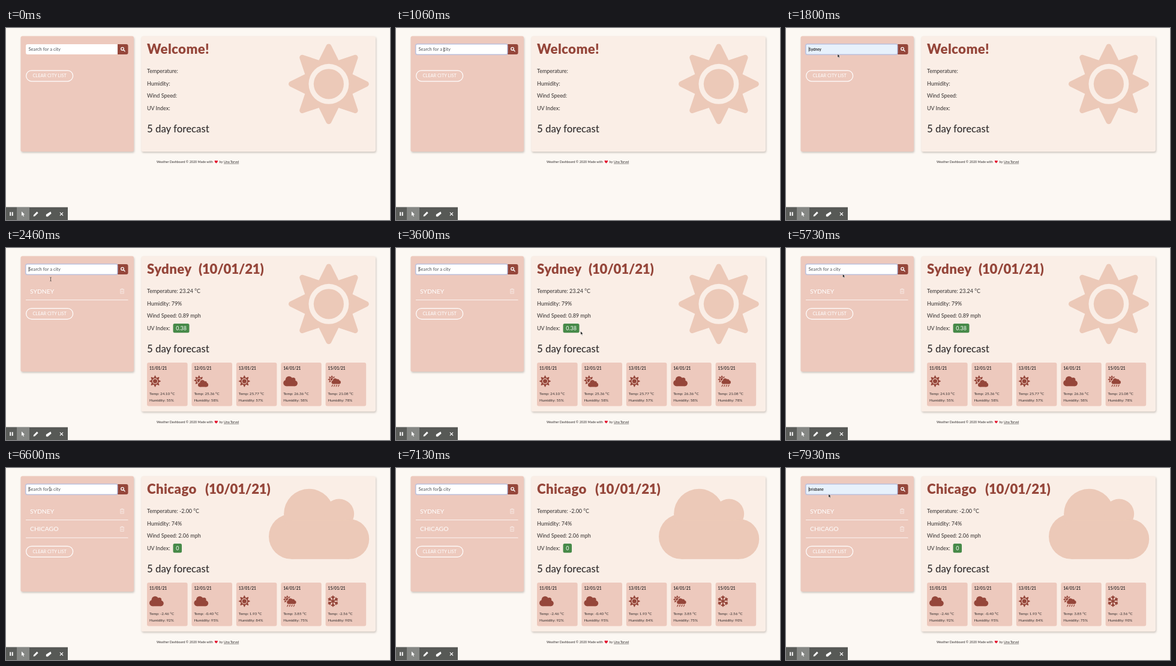
An HTML page for the animation above (8000 ms loop, 640 px wide and 320 px high).

```html
<!DOCTYPE html>
<html lang="en">
<head>
<meta charset="utf-8">
<title>Weather Dashboard</title>
<style>
  html, body { margin: 0; width: 100%; height: 100%; overflow: hidden; background: #fcf8f3; }
  svg { display: block; width: 640px; height: 320px; }
  text { font-family: Lato, "Open Sans", sans-serif; fill: #332f2f; white-space: pre; }
  .panel { filter: drop-shadow(1.5px 2px 1.5px rgba(70, 50, 40, .25)); }
  .title { font-size: 22.2px; font-weight: 900; fill: #95463a; letter-spacing: .4px; }
  .today { letter-spacing: -.25px; }
  .sub { font-size: 16.8px; font-weight: 500; }
  .info { font-size: 8.95px; }
  .date { font-size: 6.6px; font-weight: 700; }
  .small { font-size: 6.25px; }
  .foot { font-size: 5.4px; }
  .city { font-size: 10.4px; fill: #fff; }
  .clear { font-size: 7.4px; fill: #fff; }
  .hint { font-size: 7.6px; fill: #50555a; }
  .fill { font: 500 5.9px Inter, "Liberation Sans", sans-serif; fill: #111; }
</style>
</head>
<body>
<svg id="stage" viewBox="0 0 640 320"></svg>
<script>
const LOOP = 8000;
const PINK = '#edc9bd', PALE = '#faeee6', PEACH = '#ecc9b8', BROWN = '#95463a';

const text = (x, y, cls, s, extra = '') => `<text x="${x}" y="${y}" class="${cls}" ${extra}>${s}</text>`;
const rect = (x, y, w, h, r, fill, extra = '') =>
  `<rect x="${x}" y="${y}" width="${w}" height="${h}" rx="${r}" fill="${fill}" ${extra}/>`;
const circle = (x, y, r, fill) => `<circle cx="${x}" cy="${y}" r="${r}" fill="${fill}"/>`;
const group = (id, body, extra = '') => `<g id="${id}" ${extra}>${body}</g>`;

// Icons live in a box 512 units high.
function sun(cx, cy, size, color, back) {
  const at = (r, a) => `${(r * Math.cos(a)).toFixed(1)} ${(r * Math.sin(a)).toFixed(1)}`;
  const half = Math.PI / 8, bevel = 0.063, tip = 0.035;
  let d = '';
  for (let i = 0; i < 8; i++) {
    const a = i * Math.PI / 4;
    d += `${i ? 'L' : 'M'}${at(164, a - half)}L${at(247, a - bevel)}` +
      `C${at(259.4, a - tip)} ${at(259.4, a + tip)} ${at(247, a + bevel)}`;
  }
  return `<g transform="translate(${cx} ${cy}) scale(${size / 256})"><path d="${d}Z" fill="${color}"/>` +
    circle(0, 0, 128, back) + circle(0, 0, 96, color) + '</g>';
}

function puffs(list, color, gap) {
  const first = list[0], last = list[3];
  const bottom = first[1] + first[2], top = bottom - first[2] * 1.7;
  const body = list.map(c => circle(...c, color)).join('') +
    rect(first[0], top, last[0] - first[0], bottom - top, 0, color);
  const edge = gap ? `<g stroke="${gap}" stroke-width="64">${body}</g>` : '';
  return edge + body;
}

const icons = {
  sun: (c, b) => sun(256, 256, 256, c, b),
  cloud: c => puffs([[144, 336, 144], [256, 192, 160], [448, 192, 96], [512, 352, 128]], c),
  cloudSun: (c, b) => sun(224, 224, 224, c, b) +
    puffs([[272, 416, 96], [376, 312, 112], [512, 320, 64], [544, 416, 96]], c, b),
  rain: (c, b) => sun(176, 176, 176, c, b) +
    puffs([[240, 304, 80], [320, 224, 96], [432, 240, 80], [496, 304, 80]], c, b) +
    rect(120, 386, 456, 126, 0, b) +
    [210, 306, 402, 498].map(x => `<path d="M${x} 424l-36 66" stroke="${c}" stroke-width="34" stroke-linecap="round"/>`).join(''),
  snow: c => [0, 60, 120, 180, 240, 300].map(a =>
    `<path d="M224 256V30M166 66l58 56 58-56" transform="rotate(${a} 224 256)" fill="none" stroke="${c}" stroke-width="54" stroke-linecap="round"/>`).join('')
};
const icon = (name, x, y, h, color, back) =>
  `<g transform="translate(${x} ${y}) scale(${h / 512})">${icons[name](color, back)}</g>`;

function card(i, [name, temp, hum]) {
  const x = 235 + i * 74.4;
  return rect(x, 191, 67.6, 72.5, 3, PINK) +
    text(x + 4, 202.8, 'date', `${11 + i}/01/21`) +
    icon(name, x + 4, 212.5, 19, BROWN, PINK) +
    text(x + 4, 244.6, 'small', `Temp: ${temp} °C`) +
    text(x + 4, 256.3, 'small', `Humidity: ${hum}%`);
}

function view(id, v) {
  const rows = ['Temperature:', 'Humidity:', 'Wind Speed:', 'UV Index:'];
  let s = rect(225.5, 13.5, 390.5, v.days ? 259 : 192.5, 3, PALE, 'class="panel"');
  s += icon(v.icon, v.icon === 'sun' ? 471 : 438, 26.4, 133.8, PEACH, PALE);
  s += text(235, 43, 'title', v.name);
  if (v.days) s += text(v.dateX, 43, 'title today', '(10/01/21)');
  rows.forEach((r, i) => {
    s += text(235, 75.4 + i * 20.5, 'info', v.info && i < 3 ? `${r} ${v.info[i]}` : r);
  });
  if (v.days) {
    s += rect(278.5, 126, v.uvW, 15.3, 2.5, '#478a49');
    s += text(278.5 + v.uvW / 2, 137, 'info', v.uv, 'text-anchor="middle" style="fill:#fff"');
    s += v.days.map((d, i) => card(i, d)).join('');
  }
  return group(id, s + text(235, 173.6, 'sub', '5 day forecast'));
}

function cityRow(id, name, y) {
  const bin = `<path d="M190 ${y - 3}h7M192.3 ${y - 3}v-1h2.4v1M190.8 ${y - 3}v6.8h5.4v-6.8M192.4 ${y - 1}v3M194.6 ${y - 1}v3" fill="none" stroke="#fff" stroke-width=".7" opacity=".75"/>`;
  return group(id, text(40, y + 3.7, 'city', name) + bin +
    `<path d="M33 ${y + 14.6}h170.5" stroke="#fff" stroke-width=".8"/>`);
}

const sidebar =
  rect(24.5, 13.5, 188.5, 192.5, 3, PINK, 'class="panel"') +
  rect(33, 27, 156, 17, 3, '#fff') +
  '<path d="M186 26.9h14.5q3 0 3 3v11.2q0 3-3 3h-14.5z" fill="#95463a"/>' +
  '<g fill="none" stroke="#fff" stroke-width="1.3"><circle cx="194" cy="34.7" r="2.3"/><path d="M195.8 36.5l2.3 2.3" stroke-linecap="round"/></g>' +
  group('focus',
    rect(32.6, 26.6, 153.4, 17.8, 3, 'none', 'stroke="#a9bdf0" stroke-opacity=".4" stroke-width="1.8"') +
    rect(33, 27, 152.8, 17, 2.6, '#fff', 'id="field" stroke="#a7b3da" stroke-width=".8"')) +
  text(37.5, 38, 'hint', 'Search for a city', 'id="hint"') +
  text(38, 37.8, 'fill', '', 'id="typed"') +
  '<path id="caret" d="M38.2 31.5v8" stroke="#222" stroke-width=".7"/>' +
  cityRow('row1', 'SYDNEY', 72) + cityRow('row2', 'CHICAGO', 101.7) +
  group('clear', rect(33.6, 70.8, 78, 18, 9, 'none', 'stroke="#fff" stroke-width="1.2"') +
    text(72.6, 82.4, 'clear', 'CLEAR CITY LIST', 'text-anchor="middle"'));

const footer = group('footer',
  text(251, 224.8, 'foot', 'Weather Dashboard © 2020 Made with') +
  '<path id="heart" d="M0 2.4C-4-.4-2.5-2.6-1.2-2.3-.5-2.2 0-1.5 0-1.2 0-1.5.5-2.2 1.2-2.3 2.5-2.6 4-.4 0 2.4Z" fill="#e3122b"/>' +
  text(355.6, 224.8, 'foot', 'by') +
  text(363, 224.8, 'foot', 'Una Torvel', 'text-decoration="underline"'));

const toolbar =
  rect(0, 298.7, 103, 21.3, 0, '#575956') + rect(0, 298.7, 18, 21.3, 0, '#5b5d5a') +
  rect(18, 298.7, 21, 21.3, 0, '#858784') +
  '<g fill="#fff"><path d="M6.3 306.7h1.9v6.4h-1.9zM9.8 306.7h1.9v6.4h-1.9z"/>' +
  '<path d="M26 305.8v7.2l1.7-1.5 1.2 2.8 1.2-.5-1.2-2.7h2.2z"/>' +
  '<path d="M45.6 314.2l.6-2.7 5.4-5.4 2.1 2.1-5.4 5.4z"/>' +
  '<path d="M66.8 310.8l7.6-4.8 1.2 3.3-6.2 5.2-2.6-.6z"/></g>' +
  '<path d="M89.9 307.3l5.2 5.2M95.1 307.3l-5.2 5.2" stroke="#fff" stroke-width="1.1"/>';

const pointers =
  group('arrow', '<path d="M0 0v5.7l1.3-1.2 1 2.1 1-.5-1-2h1.8z" fill="#111" stroke="#fff" stroke-width=".5"/>') +
  group('beam', '<path d="M-1.2-3.2Q0-3.2 0-2.4 0-3.2 1.2-3.2M0-2.6v5.2M-1.2 3.2Q0 3.2 0 2.4 0 3.2 1.2 3.2" fill="none" stroke="#333" stroke-width=".7"/>');

const views = {
  welcome: { name: 'Welcome!', icon: 'sun' },
  sydney: {
    name: 'Sydney', dateX: 321, icon: 'sun', info: ['23.24 °C', '79%', '0.89 mph'], uv: '0.38', uvW: 27,
    days: [['sun', '24.10', 55], ['cloudSun', '25.36', 58], ['sun', '25.77', 57], ['cloud', '26.36', 58], ['rain', '21.08', 78]]
  },
  chicago: {
    name: 'Chicago', dateX: 332, icon: 'cloud', info: ['-2.00 °C', '74%', '2.06 mph'], uv: '0', uvW: 14.5,
    days: [['cloud', '-2.46', 92], ['cloud', '-0.40', 95], ['sun', '1.93', 84], ['rain', '3.85', 75], ['snow', '-2.56', 90]]
  }
};

document.getElementById('stage').innerHTML = rect(0, 0, 640, 320, 0, '#fcf8f3') + sidebar +
  Object.entries(views).map(([id, v]) => view(id, v)).join('') + footer + toolbar + pointers;

const $ = id => document.getElementById(id);
const show = (id, on) => { $(id).style.display = on ? '' : 'none'; };
const move = (id, x, y) => $(id).setAttribute('transform', `translate(${x.toFixed(2)} ${y.toFixed(2)})`);

// [start, value]: each value holds until the next start.
const places = [[0, 'welcome'], [2330, 'sydney'], [6500, 'chicago']];
const entries = [[0, ''], [1460, 'Sydney'], [2330, ''], [5930, 'chicago'], [6400, ''], [7660, 'brisbane']];
const shapes = [[0, ''], [60, 'arrow'], [800, 'beam'], [1330, 'arrow'], [2200, 'beam'], [2800, 'arrow'],
  [5330, 'beam'], [5560, 'arrow'], [6400, 'beam'], [7460, 'arrow']];
const path = [[60, 262, 130], [460, 193, 33], [600, 193, 33], [1000, 80, 36], [1300, 80, 36], [1600, 86, 43.5],
  [2060, 86, 43.5], [2260, 74.5, 52], [2730, 74.5, 52], [3130, 250, 92], [3530, 300, 134], [4000, 425, 212],
  [4400, 407, 194], [4700, 370, 186], [5260, 130, 48], [5430, 74, 36], [5730, 94.5, 43.5], [6130, 90, 45],
  [6500, 73, 35], [7260, 73, 35], [7600, 71, 43.5], [8000, 71, 43.5]];

const step = (table, t) => table.filter(r => r[0] <= t).pop()[1];
function along(t) {
  const i = Math.max(1, path.findIndex(p => p[0] > t));
  const [t0, x0, y0] = path[i - 1], [t1, x1, y1] = path[i];
  const u = Math.max(0, (t - t0) / (t1 - t0)), e = u * u * (3 - 2 * u);
  return [x0 + (x1 - x0) * e, y0 + (y1 - y0) * e];
}

function draw(t) {
  const place = step(places, t), entry = step(entries, t), shape = step(shapes, t);
  const count = places.findIndex(p => p[1] === place);
  Object.keys(views).forEach(id => show(id, id === place));
  show('row1', count > 0);
  show('row2', count > 1);
  move('clear', 0, count * 29.75);
  move('footer', 0, count ? 67 : 0);

  const focused = t >= 1000;
  show('focus', focused);
  show('hint', !entry);
  $('typed').textContent = entry;
  $('field').setAttribute('fill', entry ? '#e7f1fc' : '#fff');
  show('caret', focused && (entry || (t + 800) % 1000 < 500));

  const beat = 1 + 0.08 * Math.sin(t / 1000 * 2 * Math.PI);
  $('heart').setAttribute('transform', `translate(350.3 223) scale(${beat.toFixed(3)})`);

  const [x, y] = along(t);
  for (const id of ['arrow', 'beam']) {
    show(id, id === shape);
    move(id, x, y);
  }
}

const start = performance.now();
function tick() {
  draw((performance.now() - start) % LOOP);
  requestAnimationFrame(tick);
}
tick();
</script>
</body>
</html>
```
